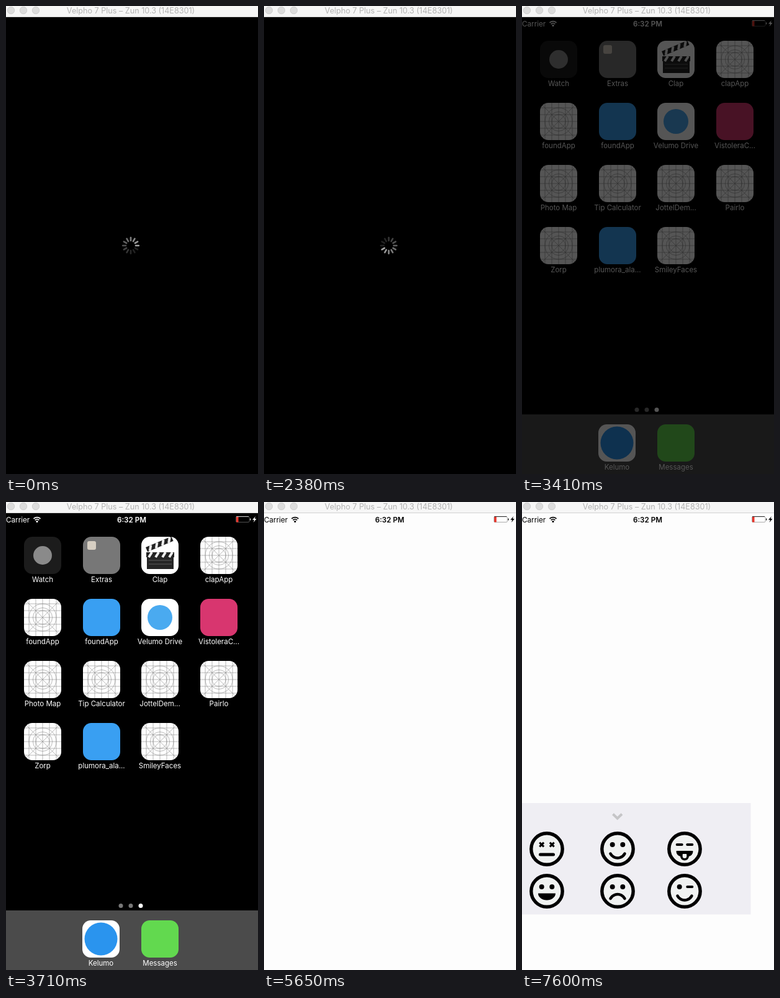
These frames come from a looping animation (406x754 px, 8000 ms). An HTML page with a canvas:

```html
<!DOCTYPE html>
<html lang="en">
<head>
<meta charset="utf-8">
<title>Simulator launch</title>
<style>
  html, body { margin: 0; width: 406px; height: 754px; overflow: hidden; background: #000; }
  canvas { display: block; }
</style>
</head>
<body>
<canvas id="stage" width="406" height="754"></canvas>
<script>
const ctx = document.getElementById('stage').getContext('2d');
const LOOP = 8000, TICK = 149;
const PAPER = '#fdfdfd';
const CENTER = { x: 201.5, y: 386 }, SCREEN = { w: 412, h: 736 };
const LAUNCH = { x: 248, y: 386, size: 60 };

const apps = [
  ['Watch', 'watch'], ['Extras', 'folder'], ['Clap', 'clapper'], ['clapApp', 'grid'],
  ['foundApp', 'grid'], ['foundApp', 'blue'], ['Velumo Drive', 'cloud'], ['VistoleraC...', 'pink'],
  ['Photo Map', 'grid'], ['Tip Calculator', 'grid'], ['JottelDem...', 'grid'], ['Pairlo', 'grid'],
  ['Zorp', 'grid'], ['plumora_ala...', 'blue'], ['SmileyFaces', 'grid']
];
const tileColor = { watch: '#1c1c1c', folder: '#777', blue: '#399ff2', pink: '#d8366f', green: '#62d94f' };

function rect(x, y, w, h, color) {
  ctx.fillStyle = color;
  ctx.fillRect(x, y, w, h);
}
function round(x, y, w, h, r, color) {
  ctx.fillStyle = color;
  ctx.beginPath();
  ctx.roundRect(x, y, w, h, r);
  ctx.fill();
}
function disc(x, y, r, color) {
  ctx.fillStyle = color;
  ctx.beginPath();
  ctx.arc(x, y, r, 0, 7);
  ctx.fill();
}
function arc(x, y, r, from, to, width, color) {
  ctx.strokeStyle = color;
  ctx.lineWidth = width;
  ctx.beginPath();
  ctx.arc(x, y, r, from * Math.PI / 180, to * Math.PI / 180);
  ctx.stroke();
}
function line(points, width, color, cap = 'butt') {
  ctx.strokeStyle = color;
  ctx.lineWidth = width;
  ctx.lineCap = cap;
  ctx.beginPath();
  points.forEach(([x, y]) => ctx.lineTo(x, y));
  ctx.stroke();
  ctx.lineCap = 'butt';
}
function text(str, x, y, size, color, align = 'center', weight = 400) {
  ctx.font = `${weight} ${size}px Inter, sans-serif`;
  ctx.textAlign = align;
  ctx.fillStyle = color;
  ctx.fillText(str, x, y);
}
function at(x, y, draw) {
  ctx.save();
  ctx.translate(x, y);
  draw();
  ctx.restore();
}
function cover(color, alpha) {
  ctx.globalAlpha = alpha;
  rect(0, 18, 406, 736, color);
  ctx.globalAlpha = 1;
}

function titleBar() {
  rect(0, 0, 406, 18, '#f6f6f6');
  rect(0, 17, 406, 1, '#d2d2d2');
  for (const x of [8, 28, 48]) {
    disc(x, 7, 6, '#dcdcdc');
    arc(x, 7, 5.7, 0, 360, 0.8, '#cbcbcb');
  }
  text('Velpho 7 Plus – Zun 10.3 (14E8301)', 201, 12, 12.6, '#b2b2b2');
}

function statusBar(color) {
  text('Carrier', 0, 33, 11.7, color, 'left');
  disc(50, 31.5, 1.6, color);
  arc(50, 32.5, 4.6, 225, 315, 1.8, color);
  arc(50, 32.5, 7.8, 225, 315, 1.8, color);
  text('6:32 PM', 202.5, 33, 11.7, color, 'center', 600);
  ctx.globalAlpha = 0.4;
  ctx.strokeStyle = color;
  ctx.lineWidth = 0.8;
  ctx.beginPath();
  ctx.roundRect(370.5, 23.5, 21.5, 9, 1.5);
  ctx.stroke();
  ctx.globalAlpha = 1;
  line([[371, 23.5], [391, 23.5]], 0.8, color);
  rect(371, 24, 3.5, 8.5, '#e8352b');
  rect(393, 26.5, 1.2, 3, color);
  ctx.fillStyle = color;
  ctx.beginPath();
  [[402, 23], [397, 28.7], [400, 28.7], [398.6, 33], [403.5, 27], [400.6, 27]].forEach(p => ctx.lineTo(...p));
  ctx.fill();
}

function spinner(step, alpha) {
  at(201, 386, () => {
    ctx.globalAlpha = alpha;
    for (let i = 0; i < 12; i++) {
      const age = (step - i + 24) % 12;
      const v = Math.max(34, 165 - age * 14);
      const a = i * Math.PI / 6, dx = Math.sin(a), dy = -Math.cos(a);
      line([[dx * 8, dy * 8], [dx * 12.8, dy * 12.8]], 2.7, `rgb(${v},${v},${v})`, 'round');
    }
  });
}

function guideLines() {
  const gray = '#8c8c8c', w = 0.6;
  for (const p of [8, 19, 30, 41, 52]) {
    line([[p, 0], [p, 60]], w, gray);
    line([[0, p], [60, p]], w, gray);
  }
  line([[0, 0], [60, 60]], w, gray);
  line([[60, 0], [0, 60]], w, gray);
  for (const r of [11, 15.6, 22]) arc(30, 30, r, 0, 360, w, gray);
}

function clapper() {
  const bar = () => {
    rect(0, 0, 45, 8, '#222');
    for (let x = 4; x < 40; x += 11) line([[x, 8], [x + 5, 0]], 4, '#eee');
  };
  rect(9, 32, 43, 20, '#252525');
  for (const y of [38, 44]) line([[12, y], [49, y]], 0.7, '#777');
  at(8, 25, bar);
  at(7, 17, () => { ctx.rotate(-0.4); bar(); });
}

function tile(x, y, kind, label) {
  at(x, y, () => {
    ctx.save();
    ctx.beginPath();
    ctx.roundRect(0, 0, 60, 60, 13.5);
    ctx.clip();
    rect(0, 0, 60, 60, tileColor[kind] || '#fff');
    if (kind === 'grid') guideLines();
    if (kind === 'clapper') clapper();
    if (kind === 'watch') disc(30, 30, 15, '#8a8a8a');
    if (kind === 'folder') round(7, 7, 14, 14, 3, '#d6cec2');
    if (kind === 'cloud') disc(30, 30, 20, '#4aaaf0');
    if (kind === 'compass') disc(30, 30, 26.5, '#2a94ee');
    ctx.restore();
    text(label, 30, 73, 11.5, '#fff');
  });
}

function home(zoom) {
  at(LAUNCH.x, LAUNCH.y, () => {
    ctx.scale(zoom, zoom);
    ctx.translate(-LAUNCH.x, -LAUNCH.y);
    const column = i => Math.round(29 + 94.6 * i);
    apps.forEach(([label, kind], i) => tile(column(i % 4), 56 + 100 * (i >> 2), kind, label));
    [185, 201, 217].forEach((x, i) => disc(x, 650.5, 3.5, i < 2 ? '#777' : '#fff'));
    rect(-10, 658, 426, 96, '#4b4b4b');
    tile(123, 674, 'compass', 'Kelumo');
    tile(218, 674, 'green', 'Messages');
  });
  statusBar('#fff');
}

function appWindow(p) {
  const mix = (a, b) => a + (b - a) * p;
  const w = mix(LAUNCH.size, SCREEN.w), h = mix(LAUNCH.size, SCREEN.h);
  at(mix(LAUNCH.x, CENTER.x), CENTER.y, () => {
    rect(-w / 2, -h / 2, w, h, PAPER);
    ctx.scale(w / SCREEN.w, h / SCREEN.h);
    ctx.translate(-CENTER.x, -CENTER.y);
    statusBar('#000');
  });
}

const ink = '#000', face = '#f0f2f1';
const dot = x => disc(x, -7, 4, ink);
const dash = x => line([[x - 4, -7], [x + 4, -7]], 4, ink, 'round');
const cross = x => [-1, 1].forEach(s => line([[x - 3.4, -7 - 3.4 * s], [x + 3.4, -7 + 3.4 * s]], 3.2, ink));
const curve = (y, from, to) => {
  ctx.lineCap = 'round';
  arc(0, y, 13, from, to, 4.5, ink);
  ctx.lineCap = 'butt';
};
const smile = () => curve(1.5, 28, 152);
const faces = [
  [cross, cross, () => line([[-10.5, 9], [10.5, 9]], 5, ink, 'round')],
  [dot, dot, smile],
  [dash, dash, () => {
    round(-13.5, 3, 27, 9, [1, 1, 8, 8], ink);
    round(-7, 4, 14, 14.5, [0, 0, 7, 7], ink);
    round(-3.3, 8, 6.6, 7, [1, 1, 3.3, 3.3], face);
  }],
  [dot, dot, () => {
    ctx.fillStyle = ink;
    ctx.beginPath();
    ctx.ellipse(0, 3.5, 14, 11, 0, 0, Math.PI);
    ctx.fill();
  }],
  [dot, dot, () => curve(18, 208, 332)],
  [dot, dash, smile]
];

function facePanel() {
  rect(0, 485, 368.5, 179.5, '#efeef3');
  line([[146.5, 502.7], [153.7, 509.7], [161, 502.7]], 4, '#c5c5c7');
  faces.forEach(([left, right, mouth], i) => at([40, 154, 262][i % 3], i < 3 ? 559 : 627, () => {
    disc(0, 0, 25, face);
    arc(0, 0, 25.2, 0, 360, 5.4, ink);
    left(-8.3);
    right(8.3);
    mouth();
  }));
}

function draw(tick) {
  rect(0, 0, 406, 754, '#000');
  if (tick < 22) {
    spinner(3 + Math.round(tick * TICK * 12 / 1000), tick < 21 ? 1 : 0.4);
  } else if (tick > 22 && tick < 38) {
    const u = Math.min(1, Math.max(0, tick - 35) * 0.42);
    const p = 1 - (1 - u) ** 3;
    home(1 + 2 * p);
    cover('#000', Math.max(0, 1 - (tick - 22) / 3, 0.92 * p));
    if (p > 0) appWindow(p);
  } else if (tick >= 38) {
    appWindow(1);
    if (tick > 48) {
      facePanel();
      ctx.globalAlpha = Math.max(0, 1 - (tick - 48) / 3);
      rect(0, 480, 406, 190, PAPER);
      ctx.globalAlpha = 1;
    }
  }
  titleBar();
}

function frame() {
  // The screen is sampled at a fixed rate, so motion advances in whole ticks.
  draw(Math.floor((performance.now() % LOOP + 16) / TICK));
  requestAnimationFrame(frame);
}
frame();
</script>
</body>
</html>
```
